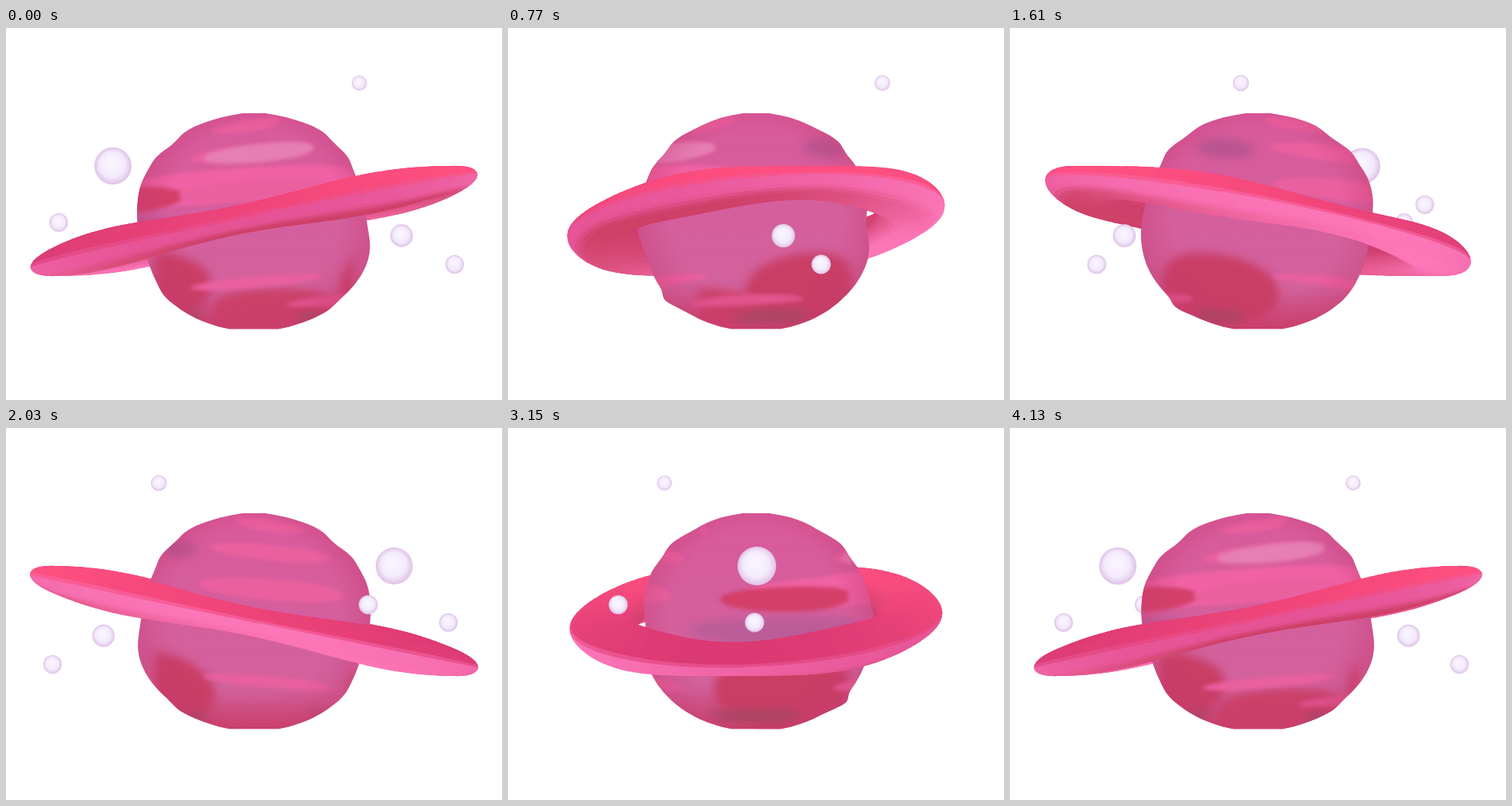
Write an HTML page with a canvas that moves like this. It is 640x480 px and loops after 4200 ms.

```html
<!DOCTYPE html>
<html lang="en">
<head>
<meta charset="utf-8">
<title>Ringed planet</title>
<style>
html, body { margin: 0; width: 100%; height: 100%; overflow: hidden; background: #fff; }
canvas { display: block; width: 640px; height: 480px; }
</style>
</head>
<body>
<canvas id="stage" width="640" height="480"></canvas>
<script>
const LOOP = 4200, STEP = 70, CX = 320, RAD = Math.PI / 180;
const TOP = 110, MID = 254, BOTTOM = 391, WIDTH = 148;
const ctx = document.getElementById('stage').getContext('2d');
const sin = d => Math.sin(d * RAD), cos = d => Math.cos(d * RAD);
const wrap = d => ((d + 180) % 360 + 360) % 360 - 180;
const clamp = (v, lo, hi) => Math.min(hi, Math.max(lo, v));
const bell = (v, mid, spread) => Math.exp(-(((v - mid) / spread) ** 2));
const mix = (a, b, k) => a.map((v, i) => Math.round(v + (b[i] - v) * clamp(k, 0, 1)));

// Half width of the planet: a full oval with lopsided lumps
function halfWidth(y, lon) {
  const d = Math.abs(y - MID) / (y < MID ? MID - TOP : BOTTOM - MID);
  const oval = WIDTH * Math.sqrt(1 - Math.min(d, .995) ** 2.3);
  const lean = 5 * cos(lon) * sin(clamp((y - 250) * 1.8, -180, 180));
  const waist = 6 * cos(lon - 114) * bell(y, 255, 25);
  const ledge = 2.5 * sin(y * 9 + lon * 2) * bell(y, 140, 35);
  const knob = 10 * bell(wrap(lon - 80), 0, 70) * bell(y, 366 - lon % 360 / 8, 10);
  return oval + lean + waist + ledge + knob;
}

function trace(points) {
  ctx.beginPath();
  points.forEach(([x, y], i) => i ? ctx.lineTo(x, y) : ctx.moveTo(x, y));
  ctx.closePath();
}

function outline(turn) {
  const lon = d => ((d % 360) + 360) % 360;
  const left = [], right = [];
  for (let y = TOP; y <= BOTTOM; y += 2.81) {
    left.unshift([CX - halfWidth(y, lon(180 - turn)), y]);
    right.push([CX + halfWidth(y, lon(-turn)), y]);
  }
  return right.concat(left);
}

// A lens lying on the surface, tilted like the ring
function drawLens(lon, span, y, h, colour, turn) {
  const mid = wrap(lon + turn - 90) + 90;
  if (mid - span > 180 || mid + span < 0) return;
  const upper = [], lower = [], n = 28;
  for (let i = 0; i <= n; i++) {
    const s = i / n * 2 - 1;
    const view = clamp(mid + s * span, 0, 180);
    const cy = y - 12 * (cos(view - turn) - cos(lon));
    const x = CX + halfWidth(clamp(cy, 114, 386), 90) * 1.05 * cos(view);
    const dy = h * Math.sqrt(1 - s * s);
    upper.push([x, cy - dy]);
    lower.unshift([x, cy + dy]);
  }
  trace(upper.concat(lower));
  ctx.fillStyle = colour;
  ctx.fill();
}

// Shadows gather on two sides of the planet, pink streaks on the other two
function drawSurface(turn) {
  const lens = (...args) => drawLens(...args, turn);
  ctx.filter = 'blur(6px)';
  lens(100, 80, 374, 34, '#cb4068');
  for (const lon of [160, 345]) {
    lens(lon, 46, 338, 48, '#c93e65');
    lens(lon + 20, 42, 372, 8, '#a24860');
  }
  lens(168, 45, 262, 18, '#bb5c98');
  lens(334, 20, 155, 12, '#b85490');
  ctx.filter = 'blur(2.5px)';
  lens(105, 80, 204, 22, '#f062a4');
  lens(162, 36, 221, 16, '#d33f68');
  for (const lon of [90, 265])
    for (const y of [125, 161, 209, 328])
      lens(lon, 40, y, 7 + 7 * bell(y, 205, 50), '#ea609f');
  lens(85, 36, 161, 12, '#e57fb4');
  lens(32, 38, 351, 7, '#e2558f');
}

function drawPlanet(turn) {
  const base = ctx.createLinearGradient(0, TOP, 0, BOTTOM);
  base.addColorStop(0, '#d95a9c');
  base.addColorStop(.8, '#d2629d');
  base.addColorStop(1, '#cb3f68');
  const edge = ctx.createRadialGradient(CX, 240, 110, CX, 250, 154);
  edge.addColorStop(0, 'rgba(200,60,120,0)');
  edge.addColorStop(1, 'rgba(196,58,108,.4)');
  ctx.save();
  trace(outline(turn));
  ctx.fillStyle = base;
  ctx.fill();
  ctx.clip();
  drawSurface(turn);
  ctx.filter = 'none';
  ctx.fillStyle = edge;
  ctx.fillRect(150, 100, 340, 300);
  ctx.restore();
}

// An oval ring with a lens-shaped section, swollen between its tips
const RING = { a: 289, b: 239, cy: 249, rise: 60, mid: .82, half: .18, thick: 18.5 };

function ringPoint(th, a, turn) {
  const r = RING.mid + RING.half * cos(a);
  const u = RING.a * r * cos(th), v = RING.b * r * sin(th);
  const thick = RING.thick * (1 + .4 * sin(2 * th) ** 2);
  return [CX + u * cos(turn) - v * sin(turn),
    RING.cy - RING.rise * r * cos(th) - thick * sin(a),
    u * sin(turn) + v * cos(turn)];
}

function ringColour(th, a) {
  const top = mix([220, 58, 116], [255, 79, 128], .5 + .5 * cos(th));
  const rim = mix([230, 84, 150], [252, 118, 184], .5 - .5 * sin(th));
  const low = mix([206, 64, 104], [255, 120, 187], .45 - .25 * cos(th) - .45 * sin(th));
  const inner = [206, 62, 108];
  if (a > 180) return mix(inner, low, (a - 180) / 70);
  if (a > 90) return mix(top, inner, (a - 120) / 70);
  return a > -20 ? mix(rim, top, (a + 5) / 18) : mix(rim, low, (-a - 32) / 28);
}

function ringFaces(turn) {
  const faces = [], dt = 3, da = 10;
  for (let th = 0; th < 360; th += dt) {
    for (let a = -90; a < 270; a += da) {
      const q = [[0, 0], [dt, 0], [dt, da], [0, da]]
        .map(([i, j]) => ringPoint(th + i, a + j, turn));
      const [p, s, r, e] = q;
      const facing = (r[0] - p[0]) * (e[1] - s[1]) - (r[1] - p[1]) * (e[0] - s[0]);
      if (facing <= 0) continue;
      const colour = `rgb(${ringColour(th + dt / 2, a + da / 2)})`;
      faces.push({ q, z: (p[2] + r[2]) / 2, colour });
    }
  }
  return faces.sort((m, n) => m.z - n.z);
}

function drawFace({ q, colour }) {
  trace(q);
  ctx.fillStyle = ctx.strokeStyle = colour;
  ctx.fill();
  ctx.stroke();
}

// Each moon circles at its own height; pass is when it crosses in front
const MOONS = [
  { y: 71, r: 10, orbit: 180, pass: 1528 },
  { y: 178, r: 24, orbit: 182, pass: 3154 },
  { y: 268, r: 14.5, orbit: 196, pass: 891 },
  { y: 305, r: 12, orbit: 260, pass: 990 },
  { y: 251, r: 12, orbit: 252, pass: 3145 },
  { y: 228, r: 12, orbit: 220, pass: 2521 }
];

function placeMoon({ y, r, orbit, pass }, t) {
  const d = (t - pass) / LOOP * 360;
  return { x: CX - orbit * sin(d), y, r: r * (1 + .04 * cos(d)), z: orbit * cos(d) };
}

function drawMoon({ x, y, r }) {
  const g = ctx.createRadialGradient(x - r * .1, y - r * .2, r * .2, x, y, r);
  g.addColorStop(0, '#f9f4ff');
  g.addColorStop(.6, '#f3eafb');
  g.addColorStop(1, '#dfc2e6');
  ctx.beginPath();
  ctx.arc(x, y, r, 0, 7);
  ctx.fillStyle = g;
  ctx.fill();
}

function draw(t) {
  const turn = t / LOOP * 360;
  const faces = ringFaces(turn + 8);
  const moons = MOONS.map(m => placeMoon(m, t)).sort((m, n) => m.z - n.z);
  const behind = o => o.z < 0, before = o => o.z >= 0;
  ctx.fillStyle = '#fff';
  ctx.fillRect(0, 0, 640, 480);
  ctx.lineWidth = .8;
  ctx.lineJoin = 'round';
  moons.filter(behind).forEach(drawMoon);
  faces.filter(behind).forEach(drawFace);
  drawPlanet(turn);
  faces.filter(before).forEach(drawFace);
  moons.filter(before).forEach(drawMoon);
}

const start = performance.now();
let shown = -1;
function tick() {
  const t = Math.floor((performance.now() - start) % LOOP / STEP) * STEP;
  if (t !== shown) draw(shown = t);
  requestAnimationFrame(tick);
}
tick();
</script>
</body>
</html>
```
